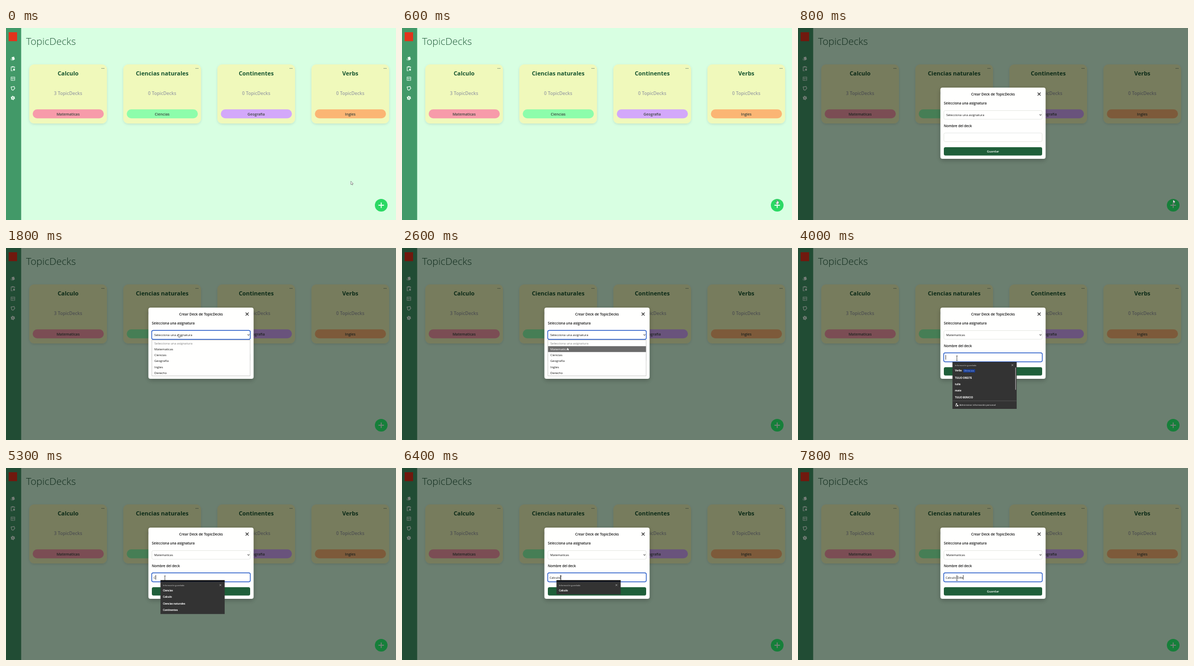
These frames come from a looping animation (738 by 364 pixels, 8000 ms). An HTML page:

```html
<!DOCTYPE html>
<html lang="es">
<head>
<meta charset="utf-8">
<style>
html, body { margin: 0; height: 100%; overflow: hidden; background: #d8ffe2; }
svg { display: block; width: 738px; height: 364px; font-family: "Open Sans", "Noto Sans", sans-serif; }
</style>
</head>
<body>
<svg id="stage" viewBox="0 0 738 364"></svg>
<script>
const LOOP = 8000, STEP = 100, BRAND = 'TopicDecks';
const stage = document.getElementById('stage');

const rect = (x, y, w, h, fill, rx = 0, extra = '') =>
  `<rect x="${x}" y="${y}" width="${w}" height="${h}" rx="${rx}" fill="${fill}" ${extra}/>`;
const text = (x, y, size, str, fill = '#111', weight = 400, anchor = 'start') =>
  `<text x="${x}" y="${y}" font-size="${size}" fill="${fill}" font-weight="${weight}" text-anchor="${anchor}" xml:space="preserve">${str}</text>`;
const line = (d, color, width = 1, extra = '') =>
  `<path d="${d}" fill="none" stroke="${color}" stroke-width="${width}" ${extra}/>`;
const cross = (x, y, r, color, width) =>
  line(`M${x - r} ${y - r}l${2 * r} ${2 * r}m0 ${-2 * r}l${-2 * r} ${2 * r}`, color, width);

const defs = `<defs>
  <filter id="soft" x="-20%" y="-20%" width="140%" height="140%"><feDropShadow dx="0" dy="1.6" stdDeviation="2" flood-opacity=".11"/></filter>
  <filter id="deep" x="-20%" y="-20%" width="140%" height="140%"><feDropShadow dx="0" dy="3" stdDeviation="4" flood-opacity=".25"/></filter>
</defs>`;

const icons = `<g fill="#eefcf2">
  <path d="M10.6 55.4l4.6-1.2 1.6 5.2-4.6 2.4z"/><path d="M9.2 56.6l1.8 5.2-1.4-.9z"/>
  <rect x="11.2" y="72.4" width="3.4" height="2" rx=".7"/><circle cx="15.2" cy="79" r="1.9"/></g>
  ${line('M12.6 81H9.8v-7.2h6.4v2.4', '#eefcf2', 1.1)}
  ${line('M9.5 92.8h7.2v6.6h-7.2zM9.5 95h7.2M12 95v4.4M14 97h2', '#eefcf2', .8)}
  ${line('M9.7 111.8l5.6-.9 1.4 3.4-3.4 3.8-2.4-1z', '#eefcf2', 1.2)}
  <circle cx="13" cy="132.6" r="2.1" fill="none" stroke="#eefcf2" stroke-width="2"/>
  <circle cx="13" cy="132.6" r="3.4" fill="none" stroke="#eefcf2" stroke-width="1.3" stroke-dasharray="1.78 1.78"/>`;

const decks = [
  ['Calculo', 3, 'Matematicas', '#f79baa'],
  ['Ciencias naturales', 0, 'Ciencias', '#8dfdab'],
  ['Continentes', 0, 'Geografía', '#d3a8fa'],
  ['Verbs', 0, 'Ingles', '#fbb574'],
];

const deckCard = ([name, count, subject, color], i) => `<g transform="translate(${44 + 178 * i} 69)">
  ${rect(0, 0, 147, 112, '#f0f9bb', 9, 'filter="url(#soft)"')}
  ${[137.2, 139.3, 141.4].map(x => `<circle cx="${x}" cy="7.6" r=".62" fill="#355"/>`).join('')}
  ${text(73.5, 21, 10.9, name, '#17552f', 700, 'middle')}
  ${text(73.5, 58.2, 8.6, `${count} ${BRAND}`, '#9a9fa3', 600, 'middle')}
  ${rect(6.5, 85.3, 134.5, 17, color, 8.5)}
  ${text(73.5, 96.6, 7, subject, '#39433d', 600, 'middle')}
</g>`;

const page = dim => rect(0, 0, 738, 364, '#d8ffe2')
  + rect(0, 0, 28.7, 364, '#429968')
  + rect(5, 8, 16, 17, '#e2331c')
  + icons
  + text(38, 31.6, 18.8, BRAND, '#1d5535', 300)
  + decks.map(deckCard).join('')
  + `<circle cx="710" cy="336" r="12" fill="${dim ? '#2cff74' : '#2bd964'}"/>`
  + line('M704.8 336h10.4M710 330.8v10.4', '#e8fff0', 1.8)
  + (dim ? rect(0, 0, 738, 364, '#000', 0, 'opacity=".5"') : '');

const field = (y, focused) => focused
  ? rect(275.7, y - .3, 186.6, 17, '#fff', 3, 'stroke="#2c5fc9" stroke-width="1.4"')
  : rect(276, y, 186, 16.4, '#fffffe', 2.5, 'stroke="#dde1dc" stroke-width=".8"');

const modal = (subject, focus, name, caret) => rect(269.5, 113, 199, 135, '#fffffe', 4, 'filter="url(#deep)"')
  + text(369, 127.6, 6.7, `Crear Deck de ${BRAND}`, '#111', 600, 'middle')
  + cross(456.3, 125.3, 2.8, '#222', 1.1)
  + text(276, 144.6, 6.45, 'Selecciona una asignatura', '#111', 600)
  + field(156.6, focus === 'select')
  + text(280.5, 167.2, 5.95, subject)
  + line('M457 163.8l1.9 1.8 1.9-1.8', '#111', 1)
  + text(276, 188.4, 6.45, 'Nombre del deck', '#111', 600)
  + field(199, focus === 'input')
  + rect(276, 226, 186, 15.8, '#1f5f3a', 3)
  + text(369, 236.1, 5.8, 'Guardar', '#fff', 600, 'middle')
  + `<text id="name" x="279.2" y="209.5" font-size="6" fill="#111" xml:space="preserve">${name}</text>`
  + (caret ? '<path id="caret" d="M279.6 203v8.6" stroke="#111" stroke-width=".8"/>' : '');

const options = ['Selecciona una asignatura', 'Matematicas', 'Ciencias', 'Geografía', 'Ingles', 'Derecho'];
const dropdown = hovered => rect(276, 174.6, 186, 67.6, '#fffffe', 0, 'stroke="#aaa" stroke-width=".6"')
  + options.map((label, i) => {
    const active = i === hovered, y = 174.9 + 11.25 * i;
    return (active ? rect(276.3, y, 185.4, 11.1, '#6b6b6b') : '')
      + text(280.8, y + 7.8, 5.95, label, active ? '#fff' : i ? '#111' : '#7a7a7a');
  }).join('');

const popupHead = (top, bottom) => rect(292.3, top, 121.5, bottom - top, '#333')
  + text(297, 223.8, 3.9, 'Información guardada', '#d0d0d0')
  + cross(405.7, 222, 1.6, '#ddd', .6);
const entry = (y, label) => text(297, y + 1.6, 4.6, label, '#fff', 700);

const savedPopup = () => popupHead(216, 305)
  + entry(232.8, 'Verbs')
  + rect(312.6, 229.8, 22.6, 6.2, '#1c3f94', 1)
  + text(323.9, 234.2, 3.7, 'Último uso', '#a9c4ff', 400, 'middle')
  + ['TULIO ORESTE', 'tulio', 'mate', 'TULIO BENICIO'].map((s, i) => entry(246 + 12.4 * i, s)).join('')
  + rect(411, 226.5, 1.4, 42.5, '#a0a0a0', .7)
  + line('M292.3 289.8h121.5', '#666', .6)
  + line('M298.5 299.6h2M298.5 299.6v-2a1.6 1.6 0 0 1 2.4-1', '#fff', .8)
  + '<circle cx="300" cy="295.6" r="1.2" fill="#fff"/><circle cx="302" cy="298.8" r="1.4" fill="#fff"/>'
  + text(305.6, 299.1, 4.35, 'Administrar información personal', '#fff');

const matchPopup = labels => {
  const bottom = 227.2 + 12.4 * labels.length;
  return popupHead(215.5, bottom) + rect(292.3, 212.6, 121.5, 3, '#0a0a0a')
    + labels.map((s, i) => entry(232.4 + 12.4 * i, s)).join('');
};

// Time and position of the pointer's resting places
const path = [
  [0, 652.6, 290.5], [600, 709.8, 325.4], [800, 709.8, 325.4], [1600, 326, 163],
  [2100, 326, 163], [2600, 312.2, 188.3], [3500, 312.2, 188.3], [3800, 300.7, 204.6], [LOOP, 300.7, 204.6],
];
function pointerAt(t) {
  const i = path.findIndex(p => p[0] > t);
  const [t0, x0, y0] = path[i - 1], [t1, x1, y1] = path[i];
  const u = (t - t0) / (t1 - t0), e = u * u * (3 - 2 * u);
  return [x0 + (x1 - x0) * e, y0 + (y1 - y0) * e];
}

const shapes = {
  arrow: '<path d="M0 0v6.4l1.5-1.3 1 2.1 1.1-.5-1-2h2z" fill="#fff" stroke="#333" stroke-width=".5"/>',
  hand: '<path d="M-.7 .4q.7-.8 1.3 0v2.5l2.2.7q.7.3.5 1.2l-.6 3.6h-3.6l-2.3-3.1q.2-1 1-.5l1.5.9z" fill="#fff" stroke="#333" stroke-width=".5"/>',
  beam: line('M-1.5 0h1.2l.3.4.3-.4h1.2M0 .4v8M-1.5 8.8h1.2l.3-.4.3.4h1.2', '#111', .7),
};

const typed = 'Calculo Dife';
const keyTimes = [5300, 5500, 5600, 5900, 6000, 6100, 6300, 6500, 7100, 7500, 7700, 7800];

function scene(t) {
  const dim = t >= 800, listOpen = t >= 1700 && t < 3300;
  const name = typed.slice(0, keyTimes.filter(k => k <= t).length);
  const [x, y] = pointerAt(t);
  let out = defs + page(dim);
  if (dim) {
    const focus = t >= 4000 ? 'input' : t >= 1700 ? 'select' : '';
    const caret = t >= 4000 && !(t >= 4500 && t < 5000);
    out += modal(options[t >= 3300 ? 1 : 0], focus, name, caret);
  }
  if (listOpen) out += dropdown(y > 186 ? 1 : -1);
  if (t >= 4000 && t < 5300) out += savedPopup();
  else if (name.length === 1) out += matchPopup(['Ciencias', 'Calculo', 'Ciencias naturales', 'Continentes']);
  else if (name && name.length < 8) out += matchPopup(['Calculo']);
  const shape = t >= 3800 ? 'beam' : t >= 600 && t < 800 ? 'hand' : 'arrow';
  return out + `<g transform="translate(${x} ${y})">${shapes[shape]}</g>`;
}

let shown = -1;
function draw(now) {
  const t = Math.floor(now % LOOP / STEP) * STEP;
  if (t !== shown) {
    shown = t;
    stage.innerHTML = scene(t);
    const caret = document.getElementById('caret'), name = document.getElementById('name');
    if (caret) caret.setAttribute('transform', `translate(${name.getComputedTextLength()} 0)`);
  }
  requestAnimationFrame(draw);
}
draw(performance.now());
</script>
</body>
</html>
```
